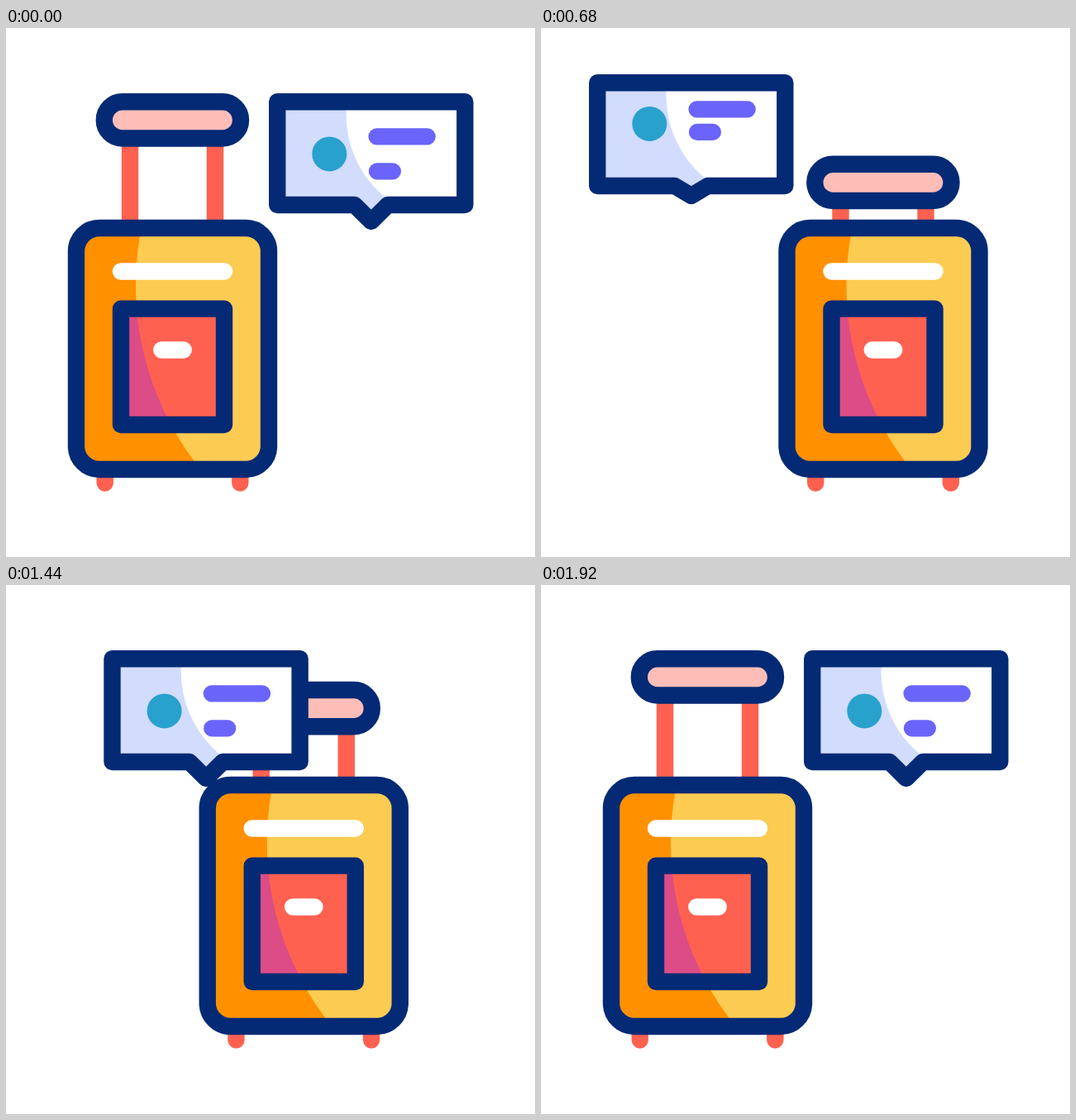
Animation of 640x640 px, one loop 2000 ms. Source, as an HTML page:

```html
<!DOCTYPE html>
<html lang="en">
<head>
<meta charset="utf-8">
<title>Suitcase and message</title>
<style>
  html, body { margin: 0; height: 100%; overflow: hidden; background: #fff; }
  svg { display: block; width: 100%; height: 100%; }
  path, rect { stroke-width: 20.4; stroke-linecap: round; stroke-linejoin: round; fill: none; }
  .navy { stroke: #042a75; }
  .coral { stroke: #ff6150; }
  .white { stroke: #fff; }
  .violet { stroke: #6a64fb; }
</style>
</head>
<body>
<svg viewBox="0 0 640 640">
  <defs>
    <clipPath id="shine"><circle cx="512" cy="311.5" r="355"/></clipPath>
    <clipPath id="glow"><circle cx="541" cy="105" r="129.5"/></clipPath>
  </defs>

  <g id="case">
    <path class="coral" d="M119.7 520V550.5M283.3 520V550.5"/>
    <path id="stems" class="coral"/>
    <rect id="handle" class="navy" x="118.8" y="89.3" width="165.2" height="44.2" rx="22.1" style="fill:#ffbdb8"/>
    <rect x="85" y="242" width="233" height="292" rx="28" style="fill:#ff9000"/>
    <rect x="85" y="242" width="233" height="292" rx="28" style="fill:#fccb52" clip-path="url(#shine)"/>
    <rect class="navy" x="85" y="242" width="233" height="292" rx="28"/>
    <path class="white" d="M139 294.5H264"/>
    <rect x="139" y="339.6" width="125" height="140.4" style="fill:#dc4c86"/>
    <rect x="139" y="339.6" width="125" height="140.4" style="fill:#ff6150" clip-path="url(#shine)"/>
    <rect class="navy" x="139" y="339.6" width="125" height="140.4"/>
    <path class="white" d="M188.3 389.5H214.7"/>
  </g>

  <g id="bubble">
    <path class="frame" style="fill:#d2dcfd"/>
    <path class="frame" style="fill:#fff" clip-path="url(#glow)"/>
    <path class="frame navy"/>
  </g>
  <g id="dot"><circle cx="391.3" cy="152.4" r="21" fill="#29a1cd"/></g>
  <path id="line1" class="violet" d="M448.6 131.4H509.6"/>
  <path id="line2" class="violet" d="M449 173.4H467.8"/>
</svg>

<script>
const LOOP = 2000, STEP = 40;
const $ = id => document.getElementById(id);
const frames = document.querySelectorAll('.frame');

// Each track is a list of [time, value] keys, eased in and out.
function track(t, keys) {
  if (t <= keys[0][0]) return keys[0][1];
  for (let i = 1; i < keys.length; i++) {
    const [t0, a] = keys[i - 1], [t1, b] = keys[i];
    if (t < t1) {
      const u = (t - t0) / (t1 - t0);
      return a + (b - a) * u * u * (3 - 2 * u);
    }
  }
  return keys[keys.length - 1][1];
}

// A dip, a jump and a settle back to rest.
const hop = (t, rest, dip, jump) =>
  track(t, [[80, rest], [400, dip], [680, jump], [1000, rest]]);

const move = (id, x, y) => $(id).setAttribute('transform', `translate(${x} ${y})`);

function draw(t) {
  const caseX = track(t, [[80, 0], [680, 212.5], [1210, 212.5], [1910, 0]]);
  const bubbleX = track(t, [[80, 0], [680, -260], [1240, -260], [1880, 0]]);
  const handleY = track(t, [[80, 0], [440, 75.5], [1240, 75.5], [1640, 0]]);
  const tail = 214 + hop(t, 20, 29.5, 12);

  move('case', caseX, 0);
  move('handle', 0, handleY);
  $('stems').setAttribute('d', `M150 ${120 + handleY}V242M253 ${120 + handleY}V242`);

  move('bubble', bubbleX, hop(t, 0, 32, -23));
  for (const f of frames)
    f.setAttribute('d', `M328.2 89.3H555.3V214H462L441.8 ${tail}L421.6 214H328.2Z`);
  move('dot', bubbleX, hop(t, 0, 45.3, -36.5));
  move('line1', bubbleX, hop(t, 0, 59.2, -33));
  move('line2', bubbleX, hop(t, 0, 45.3, -47.5));
}

const start = performance.now();
function tick() {
  const t = (performance.now() - start) % LOOP;
  draw(Math.floor(t / STEP) * STEP);
  requestAnimationFrame(tick);
}
tick();
</script>
</body>
</html>
```
